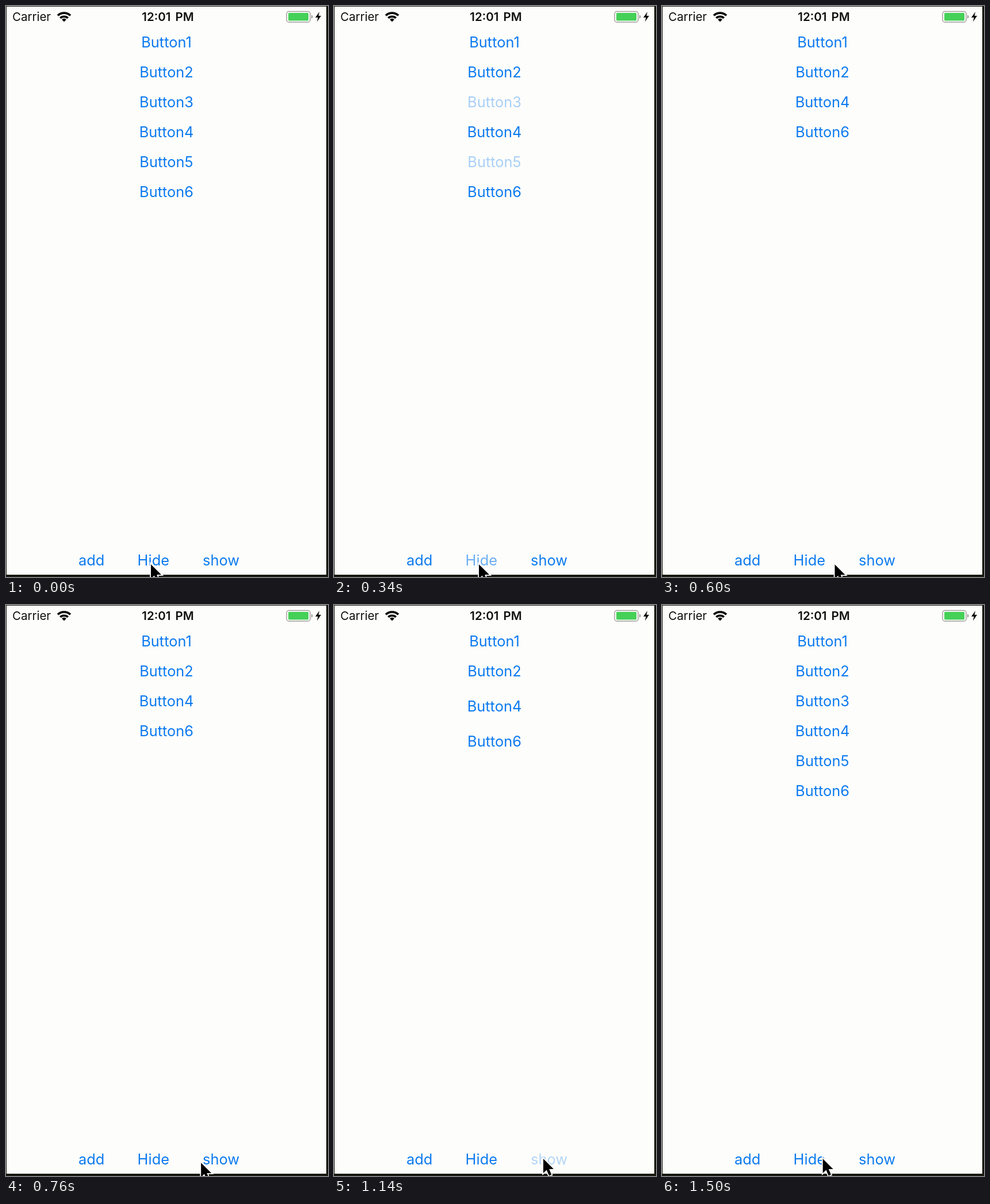
Recreate the animation shown at these times as an HTML page. Size 560 px wide and 992 px high, loop 1.52 s.

```html
<!DOCTYPE html>
<html lang="en">
<head>
<meta charset="utf-8">
<title>Stack view buttons</title>
<style>
  html, body { margin: 0; width: 100%; height: 100%; overflow: hidden; background: #fdfdfb; }
  svg { display: block; width: 560px; height: 992px; }
  text { font: 25.4px Inter, "Liberation Sans", sans-serif; fill: #0c7af0; }
  .status { font-size: 20.5px; fill: #10100c; }
  .clock { font-weight: 600; word-spacing: 3px; }
  .mid { text-anchor: middle; }
</style>
</head>
<body>
<svg viewBox="0 0 560 992">
  <rect width="560" height="992" fill="#fdfdfb"/>

  <text class="status" x="11" y="26">Carrier</text>
  <g fill="none" stroke="#0c0c08" stroke-width="3.8">
    <path d="M90 16.5a15.8 15.8 0 0 1 22 0"/>
    <path d="M94.3 21a9.6 9.6 0 0 1 13.4 0"/>
  </g>
  <path d="M101 27.5l-4-4a5.6 5.6 0 0 1 8 0z" fill="#0c0c08"/>
  <text class="status clock mid" x="281.5" y="26">12:01 PM</text>
  <rect x="488" y="9.5" width="41" height="18.5" rx="4" fill="none" stroke="#a0a09a" stroke-width="1.5"/>
  <rect x="491" y="12" width="35" height="13.5" rx="1.5" fill="#45d058"/>
  <path d="M531 15.5q2.5 1 2.5 3.2t-2.5 3.2z" fill="#a0a09a"/>
  <path d="M545 10l-7 10h4.5l-1.7 7.5 7.2-10.5h-4.5z" fill="#0c0c08"/>

  <g id="rows" class="mid"></g>
  <text class="mid" x="148.7" y="972">add</text>
  <text class="mid" id="hide" x="256.3" y="972">Hide</text>
  <text class="mid" id="show" x="374" y="972">show</text>

  <path d="M0 0H560V992H0ZM1 1V988H557V1Z" fill="#17170f" fill-rule="evenodd"/>
  <path id="pointer" d="M0 0V25L5.8 19.5L10 29.5L14.3 27.7L10.2 18H18Z"
        fill="#000" stroke="#fff" stroke-width="3.5" paint-order="stroke"/>
</svg>
<script>
const LOOP = 1520, SLIDE = 190, RECOVER = 230, ROW = 52;
const HIDE = { press: 150, release: 226 };
const SHOW = { press: 1015, release: 1091 };
// time, x, y of the pointer tip
const TRAIL = [
  [0, 252, 970], [400, 252, 970], [500, 276, 971], [760, 339, 969],
  [920, 364, 962], [1220, 364, 962], [1300, 352, 963], [1500, 280, 962], [1520, 273, 962]
];

const byId = id => document.getElementById(id);
const rows = [1, 2, 3, 4, 5, 6].map(n => {
  const label = document.createElementNS("http://www.w3.org/2000/svg", "text");
  label.textContent = "Button" + n;
  label.setAttribute("x", 279);
  byId("rows").append(label);
  return label;
});

function ease(t, start, duration) {
  const p = Math.min(1, Math.max(0, (t - start) / duration));
  return p * p * (3 - 2 * p);
}

const pressOpacity = (t, { press, release }) =>
  t < press ? 1 : 0.2 + 0.8 * ease(t, release, RECOVER);

function pointerAt(t) {
  const i = TRAIL.findIndex(point => point[0] > t);
  const [t0, x0, y0] = TRAIL[i - 1], [t1, x1, y1] = TRAIL[i];
  const p = (t - t0) / (t1 - t0);
  return [x0 + (x1 - x0) * p, y0 + (y1 - y0) * p];
}

function draw() {
  const t = performance.now() % LOOP;
  // Hiding fades, then closes the gaps; showing opens them, then fades in.
  const fade = 1 - ease(t, HIDE.release, SLIDE) + ease(t, SHOW.release + SLIDE, SLIDE);
  const closed = ease(t, HIDE.release + SLIDE, SLIDE) - ease(t, SHOW.release, SLIDE);

  rows.forEach((label, i) => {
    const hides = i === 2 || i === 4;
    const gapsAbove = (i > 2) + (i > 4);
    label.setAttribute("y", 72 + ROW * (i - (hides ? 0 : gapsAbove * closed)));
    label.setAttribute("opacity", hides ? fade : 1);
  });
  byId("hide").setAttribute("opacity", pressOpacity(t, HIDE));
  byId("show").setAttribute("opacity", pressOpacity(t, SHOW));
  byId("pointer").setAttribute("transform", `translate(${pointerAt(t)})`);
  requestAnimationFrame(draw);
}
draw();
</script>
</body>
</html>
```
